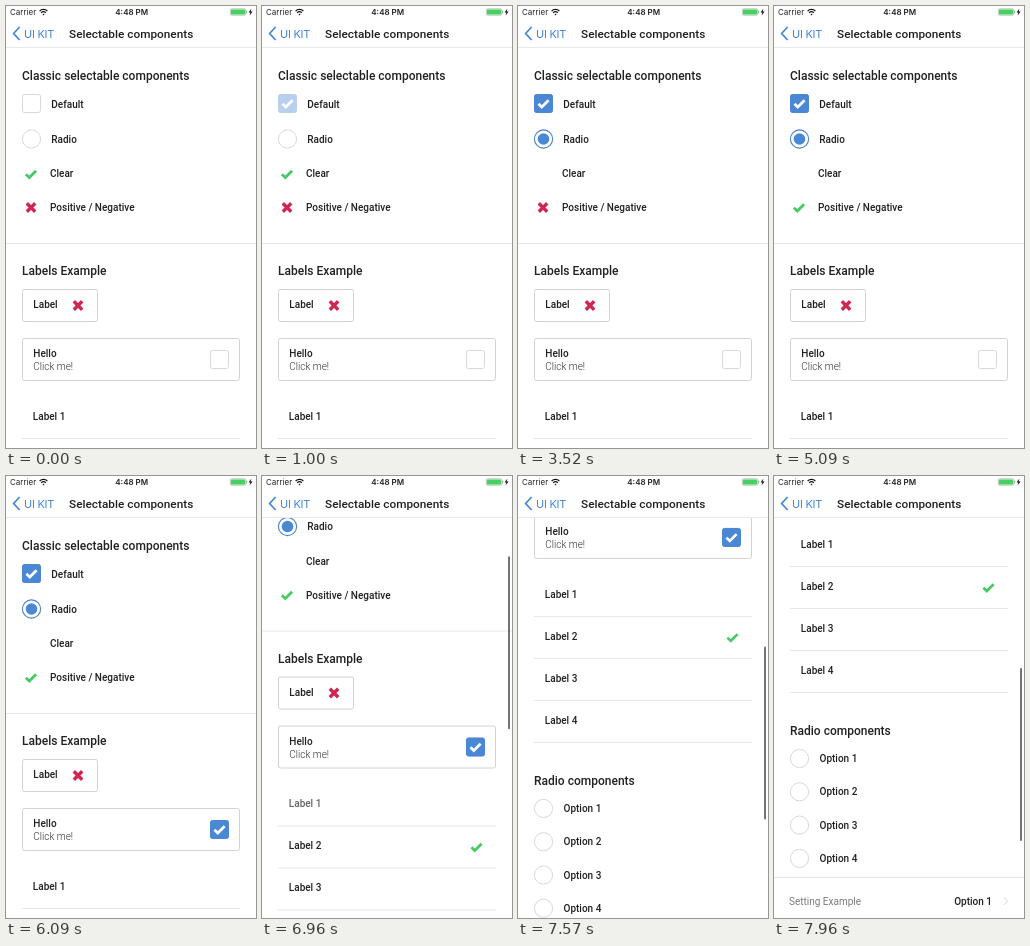
Animation of 250x442 px, one loop 8 s. Source, as an HTML page:

```html
<!DOCTYPE html>
<html lang="en">
<head>
<meta charset="utf-8">
<title>Selectable components</title>
<style>
  html, body { margin: 0; width: 100%; height: 100%; overflow: hidden; background: #fff; }
  svg { display: block; width: 100%; height: 100%; }
  text { font-family: Roboto, sans-serif; font-size: 10px; font-weight: 500; fill: #212121; white-space: pre; }
  .head { font-size: 12px; }
  .sys { font-family: Inter, sans-serif; font-size: 8px; font-weight: 400; }
</style>
</head>
<body>
<svg id="stage" viewBox="0 0 250 442">
  <defs>
    <path id="tick" d="M-5.1 .2L-1.7 3.5L5.1 -3.3" fill="none" stroke-width="2.7"/>
    <path id="cross" d="M-4.2 -4.2L4.2 4.2M4.2 -4.2L-4.2 4.2" fill="none" stroke="#d0264f" stroke-width="3.4"/>
  </defs>
  <rect width="250" height="442" fill="#fff"/>
  <g id="page"></g>
  <rect id="bar" x="246" width="2" height="173" rx="1" fill="#000"/>
  <rect width="250" height="41" fill="#fff"/>
  <path d="M0 41.5H250" stroke="#e9e9e9"/>
  <text class="sys" x="4" y="9">Carrier</text>
  <g fill="none" stroke="#111" stroke-width="1.2">
    <path d="M33.6 5A5.6 5.6 0 0 1 41.4 5M35.2 6.8A3.3 3.3 0 0 1 39.8 6.8"/>
    <circle cx="37.5" cy="8.5" r=".5" fill="#111" stroke-width=".6"/>
  </g>
  <text class="sys" x="125.7" y="9" text-anchor="middle" style="font-weight:600">4:48 PM</text>
  <rect x="224.3" y="2.8" width="15.4" height="6.4" rx="1.3" fill="#fff" stroke="#7fa889" stroke-width=".6"/>
  <rect x="225" y="3.5" width="14" height="5" rx=".8" fill="#47cf62"/>
  <path d="M240.6 4.8v2.4" stroke="#7fa889" stroke-width=".9"/>
  <path d="M245.4 2.6L242.6 6.5H244.4L243.6 9.5L246.6 5.5H244.7Z" fill="#111"/>
  <path d="M13.6 21L7.6 27.5L13.6 34" fill="none" stroke="#3f84d6" stroke-width="1.6"/>
  <text class="sys" x="18" y="32" style="font-size:11px;fill:#3f84d6;letter-spacing:-.25px">UI KIT</text>
  <text x="63" y="32" style="font-size:11.8px">Selectable components</text>
</svg>
<script>
const NS = "http://www.w3.org/2000/svg";
const BLUE = "#4a87d5", GREEN = "#45cb62", LINE = "#d9d9d9";
const LOOP = 8000;
const page = document.getElementById("page");
const bar = document.getElementById("bar");

function add(parent, tag, attrs, content) {
  const el = document.createElementNS(NS, tag);
  for (const k in attrs) el.setAttribute(k, attrs[k]);
  if (content) el.textContent = content;
  parent.appendChild(el);
  return el;
}
const group = (parent = page) => add(parent, "g", {});
const label = (x, y, s, attrs = {}, parent = page) => add(parent, "text", { x, y, ...attrs }, s);
const heading = (y, s) => label(16, y, s, { class: "head" });
const rule = (y, x1 = 0, x2 = 250) => add(page, "path", { d: `M${x1} ${y}H${x2}`, stroke: "#e8e8e8" });
const frame = (x, y, width, height) =>
  add(page, "rect", { x, y, width, height, rx: 2, fill: "#fff", stroke: "#d2d2d2" });
const icon = (parent, id, x, y, stroke) =>
  add(parent, "use", { href: "#" + id, x, y, ...(stroke && { stroke }) });

function checkbox(parent, x, y) {
  const box = { x, y, width: 18, height: 18, rx: 2 };
  add(parent, "rect", { ...box, fill: "#fff", stroke: LINE });
  const on = group(parent);
  add(on, "rect", { ...box, fill: BLUE, stroke: BLUE });
  icon(on, "tick", x + 9, y + 9, "#fff");
  return on;
}
function radio(parent, cy) {
  const at = { cx: 25.5, cy };
  add(parent, "circle", { ...at, r: 9.1, fill: "#fff", stroke: LINE });
  const on = group(parent);
  add(on, "circle", { ...at, r: 9.1, fill: "#fff", stroke: BLUE, "stroke-width": 1.1 });
  add(on, "circle", { ...at, r: 5.8, fill: BLUE });
  return on;
}

// Classic components
heading(74, "Classic selectable components");
const boxG = group(), radioG = group(), clearG = group(), signG = group();
const boxOn = checkbox(boxG, 16.5, 88.5);
const radioOn = radio(radioG, 133);
const clearTick = icon(clearG, "tick", 25, 168, GREEN);
const signCross = icon(signG, "cross", 25, 201.5);
const signTick = icon(signG, "tick", 25, 201.5, GREEN);
label(45.3, 101.5, "Default");
label(45.3, 136.7, "Radio");
label(44, 171.3, "Clear");
label(44, 205.3, "Positive / Negative");
rule(237.5);

// Labels
heading(269, "Labels Example");
frame(16.5, 283.5, 75, 32);
label(27.3, 302, "Label");
icon(page, "cross", 72, 299.5);
frame(16.5, 332.5, 217, 42);
const helloG = group();
label(27.3, 351.2, "Hello", {}, helloG);
label(27.3, 364.2, "Click me!", { style: "font-weight:300;fill:#333" }, helloG);
const helloOn = checkbox(helloG, 204.5, 344.5);
const rows = [1, 2, 3, 4].map(n => {
  const y = 371.8 + 42 * n;
  rule(y + 18.7, 16, 234);
  return label(26.8, y, "Label " + n);
});
icon(page, "tick", 214.5, 453.5, GREEN);

// Radios and setting
heading(600.8, "Radio components");
for (let n = 0; n < 4; n++) {
  const y = 624.5 + 33.3 * n;
  radio(page, y).setAttribute("visibility", "hidden");
  label(45.5, y + 3.6, "Option " + (n + 1));
}
rule(743.5);
label(15, 770.6, "Setting Example", { style: "font-weight:400;fill:#7a7a7a" });
label(218, 770.6, "Option 1", { "text-anchor": "end" });
add(page, "path", { d: "M230 763L233.5 767L230 771", fill: "none", stroke: "#d8d8d8" });

const clamp = v => Math.max(0, Math.min(1, v));
const ease = u => (u = clamp(u), u < .5 ? 2 * u * u : 1 - 2 * (1 - u) ** 2);

// Opacity of a touched element: dims while held, recovers on release
function touch(t, down, up) {
  const dim = .8 * ease((Math.min(t, up) - down) / 150);
  return 1 - dim * (1 - ease((t - up) / 250));
}

// time, offset, velocity
const SCROLL = [
  [6640, 0, 0], [6960, 82, .5], [7300, 263, .25], [7570, 292, .06], [7960, 342, .05]
];
function scrollAt(t) {
  if (t <= SCROLL[0][0]) return 0;
  const i = SCROLL.findIndex(k => k[0] >= t);
  if (i < 0) return 342;
  const [t0, y0, v0] = SCROLL[i - 1], [t1, y1, v1] = SCROLL[i];
  const d = t1 - t0, u = (t - t0) / d, w = 1 - u;
  return w * w * ((1 + 2 * u) * y0 + u * d * v0) + u * u * ((3 - 2 * u) * y1 - w * d * v1);
}

const show = (el, on) => el.setAttribute("visibility", on ? "visible" : "hidden");
const fade = (el, v) => el.setAttribute("opacity", v.toFixed(3));

const touches = [
  { el: boxG, down: 880, up: 980, on: [boxOn] },
  { el: radioG, down: 2360, up: 2450, on: [radioOn] },
  { el: clearG, down: 3270, up: 3390, off: [clearTick] },
  { el: signG, down: 3930, up: 4050, on: [signTick], off: [signCross] },
  { el: helloG, down: 5490, up: 5840, on: [helloOn] },
  { el: rows[0], down: 6500, up: 6820 }
];

function draw(t) {
  for (const { el, down, up, on = [], off = [] } of touches) {
    fade(el, touch(t, down, up));
    on.forEach(e => show(e, t >= up));
    off.forEach(e => show(e, t < up));
  }
  const y = scrollAt(t);
  page.setAttribute("transform", `translate(0 ${-y.toFixed(2)})`);
  bar.setAttribute("y", (44.7 + y * .431).toFixed(2));
  fade(bar, .55 * clamp((t - 6640) / 100));
}

const start = performance.now();
function tick() {
  draw((performance.now() - start) % LOOP);
  requestAnimationFrame(tick);
}
tick();
</script>
</body>
</html>
```
